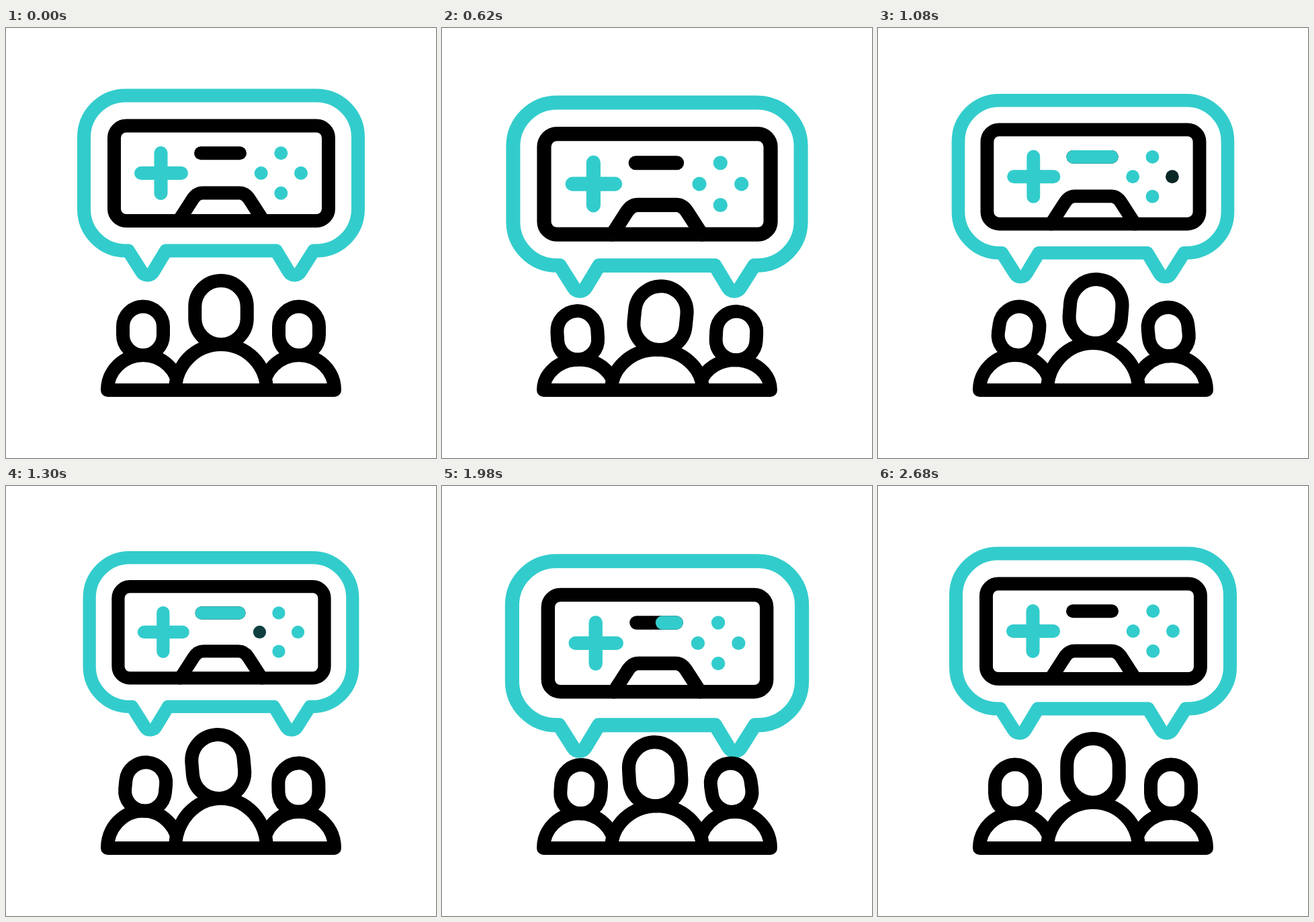
Write an HTML page that moves like this. It is 640x640 px and loops after 2840 ms.

```html
<!DOCTYPE html>
<html lang="en">
<head>
<meta charset="utf-8">
<title>Gaming community</title>
<style>
  html, body { margin: 0; width: 100%; height: 100%; overflow: hidden; background: #fff; }
  svg { display: block; width: 100%; height: 100%; }
  svg * { stroke-width: 20; stroke-linecap: round; stroke-linejoin: round; }
  .teal { stroke: #33cccc; fill: none; }
  .ink { stroke: #000; fill: none; }
  .body { fill: #fff; }
</style>
</head>
<body>
<svg viewBox="0 0 640 640">
  <g id="bubble">
    <path class="teal" d="M178 100.5H462A62 62 0 0 1 524 162.5V269.5A62 62 0 0 1 462 331.5H458L438 363A10 10 0 0 1 421 363L402 331.5H238L219 363A10 10 0 0 1 202 363L182 331.5H178A62 62 0 0 1 116 269.5V162.5A62 62 0 0 1 178 100.5Z"/>
  </g>
  <g id="pad">
    <rect class="ink" x="161" y="145.5" width="319" height="141.5" rx="18"/>
    <path class="ink" d="M257 287L278 254.5Q284 245.5 293 245.5H347Q356 245.5 362 254.5L383 287"/>
    <path class="teal" d="M201 216H261M230.5 186V246"/>
    <path class="ink" d="M290 186.3H348"/>
    <path class="teal" id="bar"/>
    <g id="dots">
      <circle cx="409.3" cy="186.3" r="10"/>
      <circle cx="409.3" cy="245.7" r="10"/>
      <circle cx="439" cy="216" r="10"/>
      <circle cx="379.7" cy="216" r="10"/>
    </g>
  </g>
  <g id="people"></g>
</svg>
<script>
const LOOP = 2840;
const $ = id => document.getElementById(id);
const clamp = x => Math.max(0, Math.min(1, x));
const smooth = x => { x = clamp(x); return x * x * (3 - 2 * x); };
const lerp = (a, b, x) => a + (b - a) * x;

// Eased value of a track of [time, value] steps
function track(steps, t) {
  if (t <= steps[0][0]) return steps[0][1];
  for (let i = 1; i < steps.length; i++) {
    const [t0, a] = steps[i - 1], [t1, b] = steps[i];
    if (t < t1) return lerp(a, b, smooth((t - t0) / (t1 - t0)));
  }
  return steps[steps.length - 1][1];
}

// Shared bounce: rest, high, low, hold, high, low, rest
const BEATS = [210, 400, 420, 1400, 1830, 1990, 2300, 2560];
function bounce(rest, high, low, high2, low2, lag) {
  const values = [rest, high, high, low, low, high2, low2, rest];
  return BEATS.map((t, i) => [t + lag, values[i]]);
}

const lift = bounce(0, 18, 1, 18, -1.5, 0);
const bubbleSize = bounce(1, 1.061, 0.957, 1.058, 0.95, 0);
const padSize = bounce(1, 1.063, 0.955, 1.063, 0.935, 60);
const barEnd = [[660, 0], [920, 1]];
const barStart = [[1800, 0], [2100, 1]];
const flashes = [880, 940, 1100, 1270];

const people = [
  { x: 204, rx: 53, ry: 52, w: 60, h: 72.5,
    drop: bounce(0, 7, -4.5, 7, -7, 80),
    tilt: [[210, 0], [500, -6], [960, 9], [1640, 2], [1980, 4], [2360, -1.5], [2680, 0]] },
  { x: 436, rx: 53, ry: 52, w: 60, h: 72.5,
    drop: bounce(0, 7.5, -3.5, 7, -7, 117),
    tilt: [[210, 0], [540, 4], [960, -7], [1400, 0], [1900, -9], [2360, 2], [2680, 0]] },
  { x: 320, rx: 68, ry: 68, w: 77.5, h: 95,
    drop: bounce(0, 9, -7, 9, -9, 42),
    tilt: [[210, 0], [900, 9], [1450, -8], [2400, 0]] }
];
const BASE = 539;

function add(tag, attrs) {
  const el = document.createElementNS('http://www.w3.org/2000/svg', tag);
  for (const k in attrs) el.setAttribute(k, attrs[k]);
  return $('people').appendChild(el);
}

for (const p of people) {
  p.top = BASE - p.ry;
  p.body = add('path', { class: 'ink body' });
  p.head = add('rect', {
    class: 'ink', x: p.x - p.w / 2, y: p.top - p.h, width: p.w, height: p.h, rx: p.w / 2
  });
}

const place = (el, size, dy) =>
  el.setAttribute('transform', `translate(320 ${216 + dy}) scale(${size}) translate(-320 -216)`);

function draw(t) {
  const dy = track(lift, t);
  place($('bubble'), track(bubbleSize, t), dy);
  place($('pad'), track(padSize, t), dy);

  const a = track(barStart, t), b = track(barEnd, t);
  $('bar').setAttribute('d', b > a ? `M${290 + 58 * a} 186.3H${290 + 58 * b}` : '');

  flashes.forEach((mid, i) => {
    const light = clamp(Math.abs(t - mid) / 100);
    const [r, g] = [51, 204].map(c => Math.round(c * light));
    $('dots').children[i].setAttribute('fill', `rgb(${r},${g},${g})`);
  });

  for (const p of people) {
    const drop = track(p.drop, t);
    p.body.setAttribute('d',
      `M${p.x - p.rx} ${BASE}A${p.rx} ${p.ry - drop} 0 0 1 ${p.x + p.rx} ${BASE}Z`);
    p.head.setAttribute('transform',
      `translate(0 ${drop}) rotate(${track(p.tilt, t)} ${p.x} ${p.top + 2})`);
  }
}

const start = performance.now();
function tick() {
  draw((performance.now() - start) % LOOP);
  requestAnimationFrame(tick);
}
tick();
</script>
</body>
</html>
```
